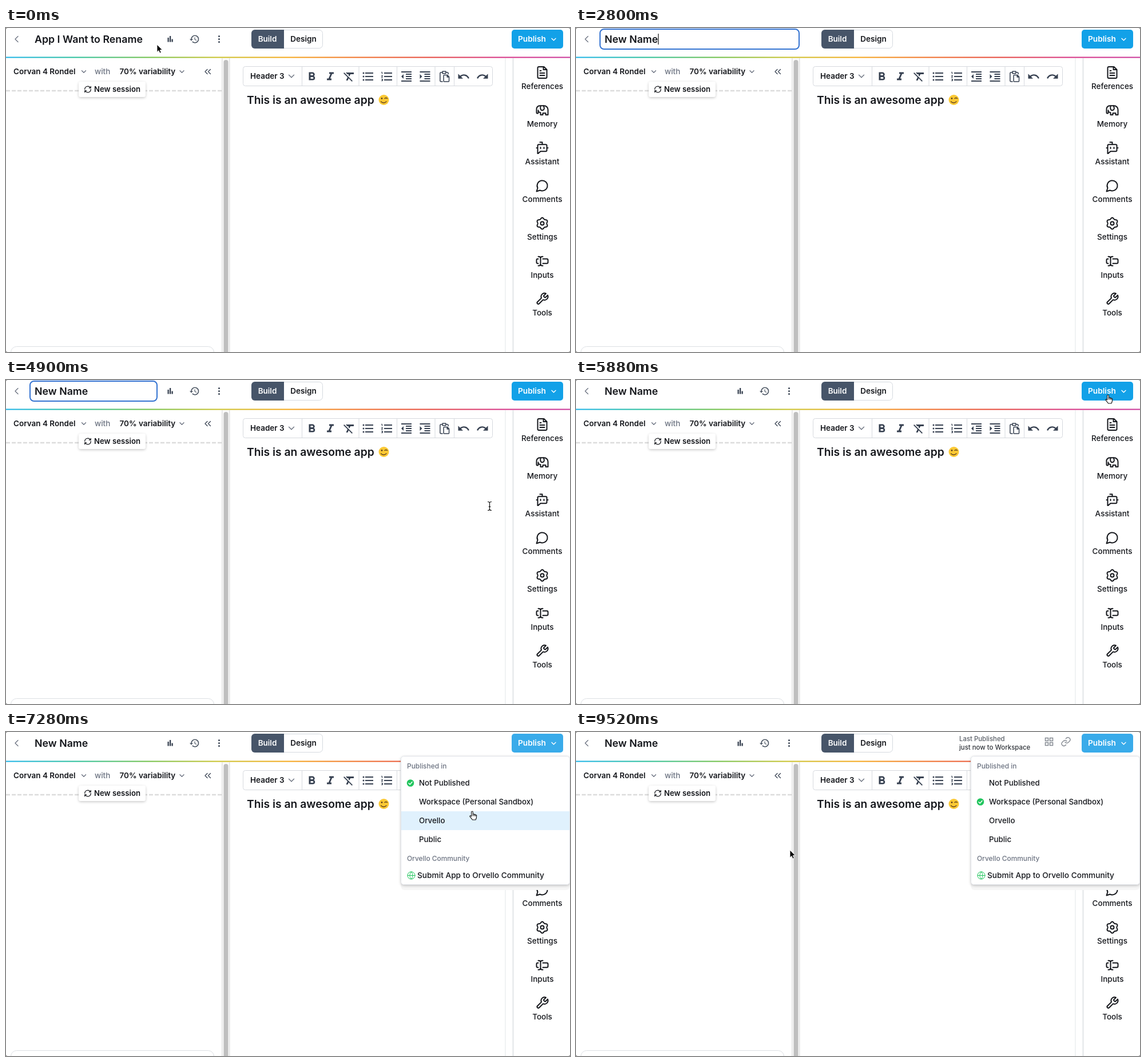
These frames come from a looping animation (986 px wide and 568 px high, 9.59 s). An HTML page:

```html
<!DOCTYPE html>
<html lang="en">
<head>
<meta charset="utf-8">
<title>Rename and publish</title>
<style>
html, body { margin: 0; width: 100%; height: 100%; overflow: hidden; background: #777; }
svg { display: block; background: #fff; border-radius: 3px; }
text { font-family: Inter, "Open Sans", sans-serif; white-space: pre; }
.line { fill: none; stroke-linecap: round; stroke-linejoin: round; }
</style>
</head>
<body>
<svg id="stage" width="986" height="568" viewBox="0 0 986 568"></svg>
<script>
const INK = '#15171c', SLATE = '#374151', GRAY = '#6b7280', GREEN = '#22c55e';
const stage = document.getElementById('stage');

// y is the middle of the capitals
const text = (x, y, s, size = 13.5, weight = 600, fill = INK, anchor = 'start') =>
  `<text x="${x}" y="${y + size * .36}" font-size="${size}" font-weight="${weight}" fill="${fill}" text-anchor="${anchor}">${s}</text>`;
const rect = (x, y, w, h, fill, more = '') =>
  `<rect x="${x}" y="${y}" width="${w}" height="${h}" fill="${fill}" ${more}/>`;
const frame = (x, y, w, h, r, stroke) => rect(x, y, w, h, '#fff', `rx="${r}" stroke="${stroke}"`);
const dot = (x, y, r, fill) => `<circle cx="${x}" cy="${y}" r="${r}" fill="${fill}"/>`;
const line = (d, color = INK, w = 1.5) => `<path class="line" d="${d}" stroke="${color}" stroke-width="${w}"/>`;
const fill = (d, color = SLATE) => `<path d="${d}" fill="${color}"/>`;
// a 24 unit icon centred on x, y
const icon = (x, y, body, k = 1, kx = k) =>
  `<g transform="translate(${x} ${y}) scale(${kx} ${k}) translate(-12 -12)">${body}</g>`;
const chevron = (x, y, color = GRAY, r = 3.5) => line(`M${x - r} ${y - r / 2}l${r} ${r}l${r} ${-r}`, color, 1.4);

function gear() {
  let d = '';
  for (let i = 0; i < 72; i++) {
    const a = i * Math.PI / 36, r = 8.9 + 1.1 * Math.cos(6 * a);
    d += `${i ? 'L' : 'M'}${(12 + r * Math.sin(a)).toFixed(2)} ${(12 - r * Math.cos(a)).toFixed(2)}`;
  }
  return d + 'ZM15 12a3 3 0 1 1-6 0 3 3 0 0 1 6 0';
}

const sidebar = {
  References: 'M15 2H6a2 2 0 0 0-2 2v16a2 2 0 0 0 2 2h12a2 2 0 0 0 2-2V7ZM14 2v5h6M16 13H8M16 17H8M10 9H8',
  Memory: 'M2 11a6 6 0 0 1 6-7h7a7 7 0 0 1 7 7v9h-4v-3h-5v3H9v-4a4 4 0 0 1-4-4M5 12v4a1.5 1.5 0 0 1-3 0v-5M9 5c-1 5 1 8 4 7s3-4 1-8',
  Assistant: 'M12 6V2H8M15 11v2M9 11v2M2 12h2M20 12h2M20 16a2 2 0 0 1-2 2H9l-4 3.5a.7.7 0 0 1-1-1V8a2 2 0 0 1 2-2h12a2 2 0 0 1 2 2z',
  Comments: 'M7.9 20A9 9 0 1 0 4 16.1L2 22Z',
  Settings: gear(),
  Inputs: 'M5 4h1a3 3 0 0 1 3 3 3 3 0 0 1 3-3h1M13 20h-1a3 3 0 0 1-3-3 3 3 0 0 1-3 3H5M5 16H4a2 2 0 0 1-2-2v-4a2 2 0 0 1 2-2h1M13 8h7a2 2 0 0 1 2 2v4a2 2 0 0 1-2 2h-7M9 7v10',
  Tools: 'M14.7 6.3a1 1 0 0 0 0 1.4l1.6 1.6a1 1 0 0 0 1.4 0l3.77-3.77a6 6 0 0 1-7.94 7.94l-6.91 6.91a2.12 2.12 0 0 1-3-3l6.91-6.91a6 6 0 0 1 7.94-7.94z'
};

const bold = 'M15.6 10.8c1-.7 1.65-1.8 1.65-2.8 0-2.26-1.75-4-4-4H7v14h7c2.1 0 3.75-1.7 3.75-3.8 0-1.5-.86-2.8-2.15-3.4zM10 6.5h3a1.5 1.5 0 0 1 0 3h-3zm3.5 9H10v-3h3.5a1.5 1.5 0 0 1 0 3z';
const italic = 'M10 4v3h2.2l-3.4 8H6v3h8v-3h-2.2l3.4-8H18V4z';
const clear = 'M3.3 5 2 6.3l7 7L6.5 19h3l1.6-3.7L16.7 21l1.3-1.3zM6 5v.2L8.8 8h2.4l-.7 1.7 2.1 2.1L14.2 8H20V5z';
const rows = 'M7 5h14v2H7zM7 11h14v2H7zM7 17h14v2H7z';
const digits = 'M2 17h2v.5H3v1h1v.5H2v1h3v-4H2zM3 8h1V4H2v1h1zM2 11h1.8L2 13.1v.9h3v-1H3.2L5 10.9V10H2z';
const block = 'M3 3h18v2H3zM11 7h10v2H11zM11 11h10v2H11zM11 15h10v2H11zM3 19h18v2H3z';
const undo = 'M12.5 8c-2.65 0-5.05 1-6.9 2.6L2 7v9h9l-3.6-3.6a8 8 0 0 1 12.7 3.6l2.4-.8C21 11 17.2 8 12.5 8z';
const clip = 'M16 5h1.5a2 2 0 0 1 2 2v1M8 5H6.500a2 2 0 0 0-2 2v13a2 2 0 0 0 2 2H9M9 3h6v4H9zM12 10h6l3 3v8a1 1 0 0 1-1 1h-8a1 1 0 0 1-1-1V11a1 1 0 0 1 1-1zM17.500 10v3.500H21';
const past = 'M13 3a9 9 0 0 0-9 9H1l4 4 4-4H6a7 7 0 1 1 2 4.900l-1.400 1.400A9 9 0 1 0 13 3zm-1 5v5l4.300 2.500.7-1.200-3.500-2V8z';
const refresh = 'M3 12a9 9 0 0 1 15.700-6.300L21 8M21 3v5h-5M21 12a9 9 0 0 1-15.700 6.300L3 16M8 16H3v5';
const link = 'M10 13a5 5 0 0 0 7.500.5l3-3a5 5 0 0 0-7-7l-1.700 1.700M14 11a5 5 0 0 0-7.500-.5l-3 3a5 5 0 0 0 7 7l1.700-1.700';

const header = line('M21 14.5l-5 5 5 5', GRAY, 1.3) +
  rect(282.5, 17, 2.3, 7.500, SLATE) + rect(286, 14, 2.3, 10.500, SLATE) + rect(289.500, 19.500, 2.3, 5, SLATE) +
  icon(329.500, 19.500, fill(past, '#4b5563'), .78) +
  [14.500, 19.500, 24.500].map(y => dot(372.500, y, 1.5, SLATE)).join('') +
  frame(429.500, 3.500, 124, 32, 6, '#d5d9df') +
  fill('M486 3v33h-51a6 6 0 0 1-6-6V9a6 6 0 0 1 6-6z', '#475569') +
  text(457, 19.500, 'Build', 13.500, 600, '#fff', 'middle') +
  text(520, 19.500, 'Design', 13.500, 600, INK, 'middle') +
  rect(0, 50.500, 986, 2, 'url(#rainbow)');

const leftPane = text(13, 76.500, 'Corvan 4 Rondel') + chevron(136, 76.500) +
  text(155, 76.500, 'with', 13.500, 500, GRAY) +
  text(198.500, 76.500, '70% variability') + chevron(307.500, 76.500) +
  line('M352 72.500l-4 4 4 4M357.500 72.500l-4 4 4 4', SLATE, 1.3) +
  '<path d="M0 110H378" stroke="#dcdcdc" stroke-width="2.500" stroke-dasharray="7 3"/>' +
  rect(127, 94, 117, 27, '#fff', 'rx="4" filter="url(#soft)"') +
  icon(143, 107.500, line(refresh, INK, 2.2), .58) + text(154, 107.500, 'New session', 13.200) +
  frame(8.500, 558.500, 355, 40, 10, '#dcdfe3') +
  rect(378, 53, 13, 515, '#fafafa') + rect(377, 53, 1.500, 515, '#e2e2e2') + rect(390, 53, 1.500, 515, '#e2e2e2') +
  rect(380.500, 56, 8, 530, '#bfbfbf', 'rx="4"');

const wink = dot(660.500, 126, 9, '#fcc934') + dot(657, 123.500, 1.400, '#5f4020') +
  line('M662 123.500q2.500-2 4.500 0M655.500 129q4.500 4.500 9.500 0', '#5f4020', 1.400);

const editor = frame(414.500, 67.500, 436, 34, 4, '#d6d9de') +
  [517, 616.500, 683, 749.500, 783].map(x => rect(x, 68, 1, 33, '#d6d9de')).join('') +
  text(427, 84.500, 'Header 3') + chevron(499, 84.500, GRAY, 4.500) +
  icon(534.500, 85.500, fill(bold)) + icon(567, 85.500, fill(italic)) + icon(600, 85, fill(clear)) +
  icon(633, 85, fill(rows) + [6, 12, 18].map(y => dot(4, y, 1.500, SLATE)).join('')) +
  icon(666, 85, fill(rows + digits)) +
  icon(700, 85, fill(block + 'M7 8v8l-4-4z')) + icon(732.500, 85, fill(block + 'M3 8v8l4-4z')) +
  icon(766, 84.500, line(clip, SLATE, 1.600), .95) +
  icon(800, 85, fill(undo), .95) + icon(833, 85, fill(undo), .95, -.95) +
  text(421, 126, 'This is an awesome app', 19.300) + wink +
  rect(872.500, 53, 1, 515, '#e2e5e8') + rect(885.500, 53, 2, 515, '#e2e5e8');

const tools = Object.entries(sidebar).map(([name, d], i) =>
  icon(937.500, 78 + i * 66.150, line(d, INK, 2)) +
  text(937.500, 102 + i * 66.150, name, 13.500, 500, INK, 'middle')).join('');

const menu = `<g id="menu">` +
  rect(690.500, 60, 295, 217, '#f6f6f6', 'rx="6"') +
  rect(690.500, 42.500, 295, 225, '#fff', 'rx="5" stroke="#e0e3e8" filter="url(#soft)"') +
  rect(691, 73, 294, 33, '#e0f1fd', 'id="hover"') +
  text(701, 59.500, 'Published in', 11.900, 500, GRAY) +
  ['Not Published', 'Workspace (Personal Sandbox)', 'Orvello', 'Public']
    .map((s, i) => text(722, 89.500 + 33 * i, s, 13.300, 500)).join('') +
  text(701, 221.500, 'Orvello Community', 11.900, 500, GRAY) +
  line('M715 251.500a6.500 6.500 0 1 1-13 0a6.500 6.500 0 0 1 13 0ZM702 251.500h13M708.500 245q-5.500 6.500 0 13q5.500-6.500 0-13', GREEN, 1) +
  text(719, 251.500, 'Submit App to Orvello Community', 13.700, 500) +
  `<g id="check">${dot(707, 89.500, 6.300, GREEN)}${line('M704 89.700l2.200 2.200 3.900-4.300', '#fff', 1.500)}</g>` +
  `<g id="spin"><circle r="6.300" fill="none" stroke="#d9d9d9" stroke-width="2"/>${line('M6.300 0A6.300 6.300 0 0 1-6.300 0', '#8c8c8c', 1.800)}</g></g>`;

const published = `<g id="done">` +
  text(670, 12, 'Last Published', 11.400, 500, '#5b6068') + text(670, 27, 'just now to Workspace', 11.400, 500, '#30343a') +
  [820.500, 828.500].map(x => [10.500, 18.500].map(y => rect(x, y, 5, 5, 'none', 'stroke="#858a92" stroke-width="1.500"')).join('')).join('') +
  icon(856.500, 17, line(link, '#858a92', 1.800), .78) + '</g>';

const pointers =
  `<path id="arrow" d="M0 0v13.300l3-2.800 2 4.600 2.300-1-2-4.500h4z" fill="#000" stroke="#fff" stroke-width=".9"/>` +
  `<g id="beam">${line('M-3-7.500q3 0 3 2q0-2 3-2M0-5.500v11M-3 7.500q3 0 3-2q0 2 3 2M-1.500 1h3', '#fff', 3)}${line('M-3-7.500q3 0 3 2q0-2 3-2M0-5.500v11M-3 7.500q3 0 3-2q0 2 3 2M-1.500 1h3', '#000', 1.100)}</g>` +
  `<path id="hand" class="line" style="fill:#fff" stroke="#111" stroke-width="1.100" d="M-1.300 9V1.300a1.300 1.300 0 0 1 2.600 0V5q1.600-.8 2.300.6q1.600-.6 2.200.7q1.800-.4 1.900 1.200q.2 4-1.700 7.500H.5Q-1.500 12-4 9.300q-.6-1.600 1-1.500l1.700 1.200M1.300 5v3M3.600 5.600V8M5.800 6.300V8.500"/>`;

const hues = ['#1bb3e8', '#2bbf9a', '#6fc04a', '#c9c22c', '#f5a81c', '#f0702a', '#e5483c', '#d63384', '#c9389a'];
stage.innerHTML = `<defs>
  <linearGradient id="rainbow">${hues.map((c, i) => `<stop offset="${i / 8}" stop-color="${c}"/>`).join('')}</linearGradient>
  <filter id="soft" x="-10%" y="-30%" width="120%" height="170%"><feDropShadow dx="0" dy="1.500" stdDeviation="2.200" flood-opacity=".22"/></filter>
  </defs>` + header + leftPane + editor + tools +
  rect(884, 3, 90, 33, '#12a1e8', 'id="button" rx="5"') + text(895, 19.500, 'Publish', 13.700, 600, '#fff') + chevron(957.500, 20, '#fff') +
  rect(42, 2, 222, 35, '#fff', 'id="field" rx="7" stroke="#3473d1" stroke-width="2"') +
  rect(50, 7, 0, 25, '#b4d7fe', 'id="selection"') +
  text(50, 19.500, '', 17.800).replace('<text', '<text id="name"') +
  rect(0, 10, 1.200, 19, '#111', 'id="caret"') + published + menu + `<g id="pointer">${pointers}</g>`;

const el = {};
stage.querySelectorAll('[id]').forEach(e => el[e.id] = e);
const show = (e, on) => e.style.display = on ? '' : 'none';
const ramp = (t, from, ms) => Math.min(1, Math.max(0, (t - from) / ms));
const ease = p => 1 - (1 - p) ** 3;

const LOOP = 9590, STEP = 70;
const typedAt = [1960, 2100, 2170, 2240, 2450, 2590, 2730, 2800];
const path = [
  [0, 264, 29], [140, 218, 24], [3500, 218, 24], [4060, 290, 196], [4270, 290, 196],
  [4550, 560, 312], [4900, 845.500, 221], [5110, 944, 200], [5250, 940, 190], [5810, 930, 26],
  [6510, 930, 26], [6650, 838, 76], [6790, 838, 76], [6860, 835, 78], [6930, 835, 78],
  [7280, 815, 139], [7490, 815, 139], [7630, 813, 137], [7770, 814, 136], [8400, 814, 136],
  [8820, 793, 145], [9520, 374, 207], [LOOP, 374, 207]
];

function pointerAt(t) {
  const i = path.findIndex(k => k[0] > t);
  const [t0, x0, y0] = path[i - 1], [t1, x1, y1] = path[i];
  const p = (t - t0) / (t1 - t0);
  return [x0 + (x1 - x0) * p, y0 + (y1 - y0) * p];
}

function pointerKind(x, y, open) {
  if (open && x > 690 && y > 42 && y < 268) return 'hand';
  if (x > 884 && (y < 36 || y > 60)) return 'hand';
  if (x < 262 && y < 38 || !open && x > 410 && x < 872 && y > 105) return 'beam';
  return 'arrow';
}

function draw(t) {
  const open = t >= 6160, loading = t >= 7910 && t < 8890, done = t >= 8890;

  const typed = typedAt.filter(k => k <= t).length;
  el.name.textContent = typed ? 'New Name'.slice(0, typed) : 'App I Want to Rename';
  const width = el.name.getComputedTextLength();
  show(el.field, t >= 280 && t < 5530);
  el.field.setAttribute('width', 222 + 126 * (ease(ramp(t, 280, 280)) - ease(ramp(t, 3500, 350))));
  show(el.selection, t >= 490 && t < 1960);
  el.selection.setAttribute('width', width);
  show(el.caret, typed && t < 3290);
  el.caret.setAttribute('x', 50 + width);

  const [x, y] = pointerAt(t);
  const kind = pointerKind(x, y, open);
  show(el.pointer, t < 1960 || t >= 3570);
  el.pointer.setAttribute('transform', `translate(${x} ${y})`);
  for (const k of ['arrow', 'beam', 'hand']) show(el[k], k === kind);

  el.button.setAttribute('fill', open ? '#39abea' : '#12a1e8');
  show(el.menu, open);
  el.menu.setAttribute('opacity', ramp(t, 6090, 210));
  const row = t >= 7630 ? 1 : Math.floor((y - 73) / 33);
  show(el.hover, !done && row >= 0);
  el.hover.setAttribute('y', 73 + 33 * row);
  el.check.setAttribute('transform', `translate(0 ${done ? 33 : 0})`);
  show(el.spin, loading);
  el.spin.setAttribute('transform', `translate(966.500 58.500) rotate(${(t - 8820) * .36})`);
  show(el.done, done);
}

const start = performance.now();
function tick() {
  const t = (performance.now() - start) % LOOP;
  draw(Math.floor(t / STEP) * STEP);
  requestAnimationFrame(tick);
}
tick();
</script>
</body>
</html>
```
